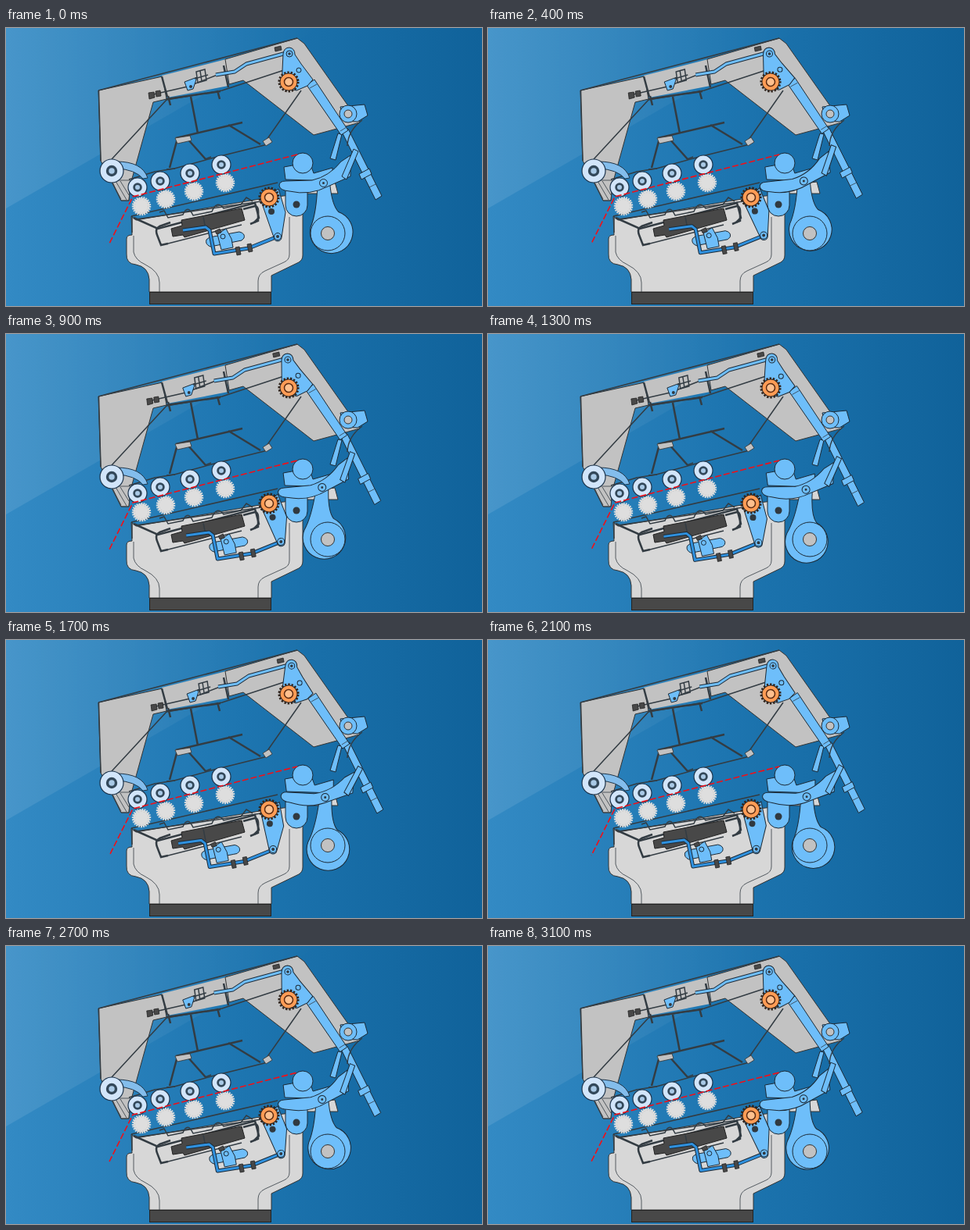
These frames come from a looping animation (608x356 px, 3200 ms). An HTML page:

```html
<!DOCTYPE html>
<html lang="en">
<head>
<meta charset="utf-8">
<title>Machine linkage</title>
<style>
  html, body { margin: 0; width: 100%; height: 100%; overflow: hidden; background: #1c72ad; }
  svg { display: block; width: 608px; height: 356px; }
  .blue { fill: #6ebefa; stroke: #1c2a36; }
  .grey { fill: #c2c2c2; stroke: #333; }
  .base { fill: #d7d7d7; stroke: #333; }
  .dark { fill: #484848; stroke: #222; }
  .line { fill: none; stroke: #333c43; stroke-width: 1.5; }
  .thick { stroke-width: 2.5; }
  .thin { stroke-width: .8; }
  .edge { fill: none; stroke: #1c2a36; stroke-width: 5; stroke-linejoin: round; }
  .bar { fill: none; stroke: #2f91df; stroke-width: 3; stroke-linejoin: round; }
  .light { stroke: #6ebefa; }
  .hole { fill: #303940; }
</style>
</head>
<body>
<svg viewBox="0 0 608 356">
  <defs>
    <linearGradient id="sky">
      <stop stop-color="#338ac4"/><stop offset=".5" stop-color="#1d75b0"/><stop offset="1" stop-color="#10629a"/>
    </linearGradient>
    <linearGradient id="beam">
      <stop stop-color="#fff" stop-opacity=".1"/><stop offset="1" stop-color="#fff" stop-opacity="0"/>
    </linearGradient>
  </defs>
  <rect width="608" height="356" fill="url(#sky)"/>
  <path d="M0 0H400L0 231Z" fill="url(#beam)"/>

  <!-- Upper housing -->
  <path class="grey" d="M118 80L200 62L205 91L188 95L159 200L157 221H147L134 195L121 170Z"/>
  <path d="M199 61L281 40L284 74L206 89Z" fill="#c2c2c2"/>
  <path class="grey" d="M280 40L372 13L381 20L452 121L393 137L303 67L285 72Z"/>
  <path class="line thin" d="M135 195H159L157 221H147ZM140 196L154 220M146 196L157 214M136 199L147 219"/>
  <path class="line" d="M118 80L372 13M118.500 80L121 170"/>
  <path class="line" d="M135 168L205 92L276 80L358 53M377 80L333 143"/>
  <path class="line thick" d="M199 62L206 88M278 48L284 76M205 91L274 81M207 87L210 99M270 80L273 91"/>
  <path class="line thick" d="M236 88L245 135M217 141L302 121M218 145L209 179M231 141L255 168M284 124L325 149"/>
  <path class="line" d="M205 181L216 180M254 168L262 165"/>
  <path class="line" d="M157 194L190 184L215 180L262 167L330 150L339 144"/>
  <path class="grey thin" d="M216 141L235 138L237 144L219 148ZM328 145L336 140L340 146L332 151Z"/>

  <!-- Base -->
  <path class="base" d="M160 241L166 246L330 218L379 212V291Q379 297 374 300L339 317V338H183V322Q182 306 166 303Q153 302 154 289V270Q154 265 161 265Z"/>
  <path class="base" d="M380 202L420 197L424 212H380Z"/>
  <path class="line thin" d="M163 266V287Q165 297 178 303Q196 312 196 326V338M362 242V290Q362 297 355 300L331 311Q322 315 322 324V338"/>
  <rect class="dark" x="183.500" y="338.500" width="155" height="15"/>
  <path class="line" d="M160 241L347 198M161 241V262M166 245L326 222"/>
  <path class="line thick" d="M163 243L194 257L318 224L323 243L317 249"/>
  <path class="line" d="M196 236L202 234L207 243L226 239Q232 225 239 240L263 235Q269 220 278 231L300 226L307 217L315 222"/>
  <path class="dark" d="M211 257L225 253L224 246L301 231L305 246L228 268L226 265L213 267Z"/>
  <path class="line thick" d="M210 249L196 254Q190 257 193 265L198 278L207 276M303 232L318 228Q323 228 322 240V247L312 251"/>
  <path class="line" d="M207 276L301 252M252 242L255 257"/>

  <!-- Upper pull link -->
  <g id="pull">
    <path class="line" d="M184 86L232 75L270 60"/>
    <path class="edge" d="M268 60L292 56L307 46L358 32"/>
    <path class="bar light" d="M268 60L292 56L307 46L358 32"/>
    <path class="dark thin" d="M182 83L189 82L190 89L183 91ZM191 81L197 80L198 87L192 88ZM343 25L351 23L352 28L344 30Z"/>
    <path class="blue" d="M228 69L244 63L239 78L232 80Z"/>
    <path class="line" d="M243 56L254 53L256 67L245 70ZM248 55L250 68M241 65L258 60"/>
    <circle class="hole" cx="236" cy="75" r="2"/>
  </g>

  <!-- Tensioner -->
  <path class="blue" d="M427 101L458 98L462 112L449 120L431 119Z"/>
  <circle class="blue" cx="437" cy="110" r="11"/>
  <circle class="grey" cx="437" cy="110" r="5"/>
  <path class="blue" d="M414 167L424 135L429 136L421 169Z"/>

  <!-- Push rod -->
  <g id="rod">
    <path class="blue" d="M429 133L437 129L480 215L472 220Z"/>
    <path class="blue" d="M384 73L394 66L437 131L428 137Z"/>
    <path class="line thin" d="M388 77L397 72M427 132L435 127M464 204L472 200"/>
    <path class="blue" d="M451 187L464 180L467 187L454 194Z"/>
  </g>
  <path class="line" d="M455 118Q437 131 436 151"/>
  <g id="upperArm">
    <path class="blue" d="M354 33Q355 25 362 25Q369 26 369 34L377 46L392 66L385 74L371 80L352 75Z"/>
    <circle class="blue" cx="362" cy="33" r="4"/>
    <circle class="hole" cx="362" cy="33" r="1.800"/>
    <circle class="blue" cx="374" cy="54" r="3"/>
    <g id="upperGear"></g>
  </g>

  <!-- Eccentric drive -->
  <path id="conrod" class="blue" d="M-25 -11Q-15 -27 -8 -62A8 8 0 0 1 8 -62Q6 -34 13 -24A27.300 27.300 0 1 1 -25 -11Z"/>
  <circle class="blue" cx="411" cy="263" r="22"/>
  <circle class="grey" cx="411" cy="263" r="8.500"/>
  <path class="blue" d="M357 207H385V227A14 14 0 0 1 357 227Z"/>
  <circle class="hole" cx="371" cy="226" r="4.500"/>
  <path id="pad" class="blue" d="M355 178L388 172L393 186L417 179V196L357 194Z"/>
  <g id="lever">
    <path class="blue" d="M349 202Q349 196 357 196L391 195Q413 190 428 171L440 163V190L411 203Q388 215 362 209Q350 208 349 202Z"/>
    <path class="blue" d="M444 155L450 158L435 194L429 190Z"/>
    <circle class="blue" cx="405.500" cy="198.500" r="5"/>
    <circle class="hole" cx="405.500" cy="198.500" r="1.500"/>
  </g>
  <circle class="blue" cx="379" cy="173" r="13"/>

  <!-- Lower slide -->
  <g id="slide">
    <path class="blue" d="M260 268L298 261Q306 263 304 269Q302 273 296 273L261 280Q254 277 256 271Z"/>
    <path class="edge" d="M226 259L255 255L260 259L266 289L310 282L347 267"/>
    <path class="bar" d="M226 259L255 255L260 259L266 289L310 282L347 267"/>
    <path class="blue" d="M270 264L281 257L288 270L290 281L275 284Z"/>
    <circle class="blue" cx="277" cy="267" r="3"/>
    <path class="dark thin" d="M293 281L298 280L300 290L295 291ZM308 277L313 276L315 286L310 287ZM267 260L273 257L275 262L269 264Z"/>
  </g>
  <g id="lowerArm">
    <path class="blue" d="M326 222L348 206L357 236L352 268A5 5 0 0 1 342 268Z"/>
    <circle class="blue" cx="347" cy="267" r="4.500"/>
    <circle class="hole" cx="347" cy="267" r="2"/>
    <circle class="hole" cx="339" cy="235" r="4"/>
    <g id="lowerGear"></g>
  </g>

  <!-- Feed rollers and material -->
  <path d="M141 171Q174 171 181 192L175 193Q165 181 141 180Z" fill="#83bdec" stroke="#20364a"/>
  <g id="rollers"></g>
  <path id="thread" d="M372 162L162 216L132 276" fill="none" stroke="#f01018" stroke-width="1.600" stroke-dasharray="8 3"/>
</svg>
<script>
  const FRAME_MS = 100, FRAMES = 32, LEVER_SWING = 5;
  const $ = id => document.getElementById(id);
  const place = (id, transform) => $(id).setAttribute('transform', transform);
  const radians = degrees => degrees * Math.PI / 180;

  const gear = (x, y) => `<g transform="translate(${x} ${y})">
    <circle r="11" fill="#ff9c55" stroke="#30241d"/>
    <circle r="12.300" fill="none" stroke="#30241d" stroke-width="2.500" stroke-dasharray="2.400 1.900"/>
    <circle r="5.500" fill="#ffc08e" stroke="#5b2b12" stroke-width="1.500"/></g>`;
  const roller = (x, y, r) => `<g transform="translate(${x} ${y})">
    <circle r="${r}" fill="#d2e5fa" stroke="#1d344c" stroke-width="1.200"/>
    <circle r="${r * .48}" fill="#33485a"/>
    <circle r="${r * .25}" fill="#a9c9e6"/></g>`;
  const brush = (x, y) => `<g class="brush" data-at="${x} ${y}">
    <circle r="10.500" fill="#dedede"/>
    <circle r="11" fill="none" stroke="#dedede" stroke-width="2.500" stroke-dasharray="1.800 1.200"/>
    <circle r="8.500" fill="none" stroke="#cdcdcd" stroke-dasharray="1.500 2"/></g>`;

  $('upperGear').innerHTML = gear(361, 69);
  $('lowerGear').innerHTML = gear(336, 217);
  $('rollers').innerHTML = roller(135, 183, 15)
    + [[173, 228], [204, 219], [240, 209], [280, 198]].map(p => brush(...p)).join('')
    + [[168, 204], [197, 196], [235, 186], [275, 175]].map(p => roller(...p, 12)).join('');
  const brushes = document.querySelectorAll('.brush');

  function draw(now) {
    const step = Math.floor(now / FRAME_MS) % FRAMES;
    const angle = radians(20 + 15 * step);
    const swing = -Math.cos(angle - radians(110));

    place('upperArm', `rotate(${4.6 * swing} 361 69)`);
    place('pull', `translate(${3.2 * swing} 0)`);
    place('rod', `translate(${1.9 * swing} ${2.1 * swing})`);
    place('pad', `translate(${1.3 * swing} 0)`);
    place('lever', `rotate(${LEVER_SWING * swing} 371 226)`);
    place('lowerArm', `rotate(${6.9 * swing} 336 217)`);
    place('slide', `translate(${-6 * swing} ${1.5 * swing})`);

    // The connecting rod follows the eccentric and the lever pin.
    const ex = 411 + 5 * Math.cos(angle), ey = 263 - 5 * Math.sin(angle);
    const turn = radians(LEVER_SWING * swing);
    const px = 371 + 34.5 * Math.cos(turn) + 27.5 * Math.sin(turn);
    const py = 226 - 27.5 * Math.cos(turn) + 34.5 * Math.sin(turn);
    const tilt = Math.atan2(px - ex, ey - py) * 180 / Math.PI;
    place('conrod', `translate(${ex} ${ey}) rotate(${tilt})`);

    for (const b of brushes) b.setAttribute('transform', `translate(${b.dataset.at}) rotate(${-7 * step})`);
    $('thread').setAttribute('stroke-dashoffset', -2.5 * step);
    requestAnimationFrame(() => draw(performance.now()));
  }
  draw(0);
</script>
</body>
</html>
```
